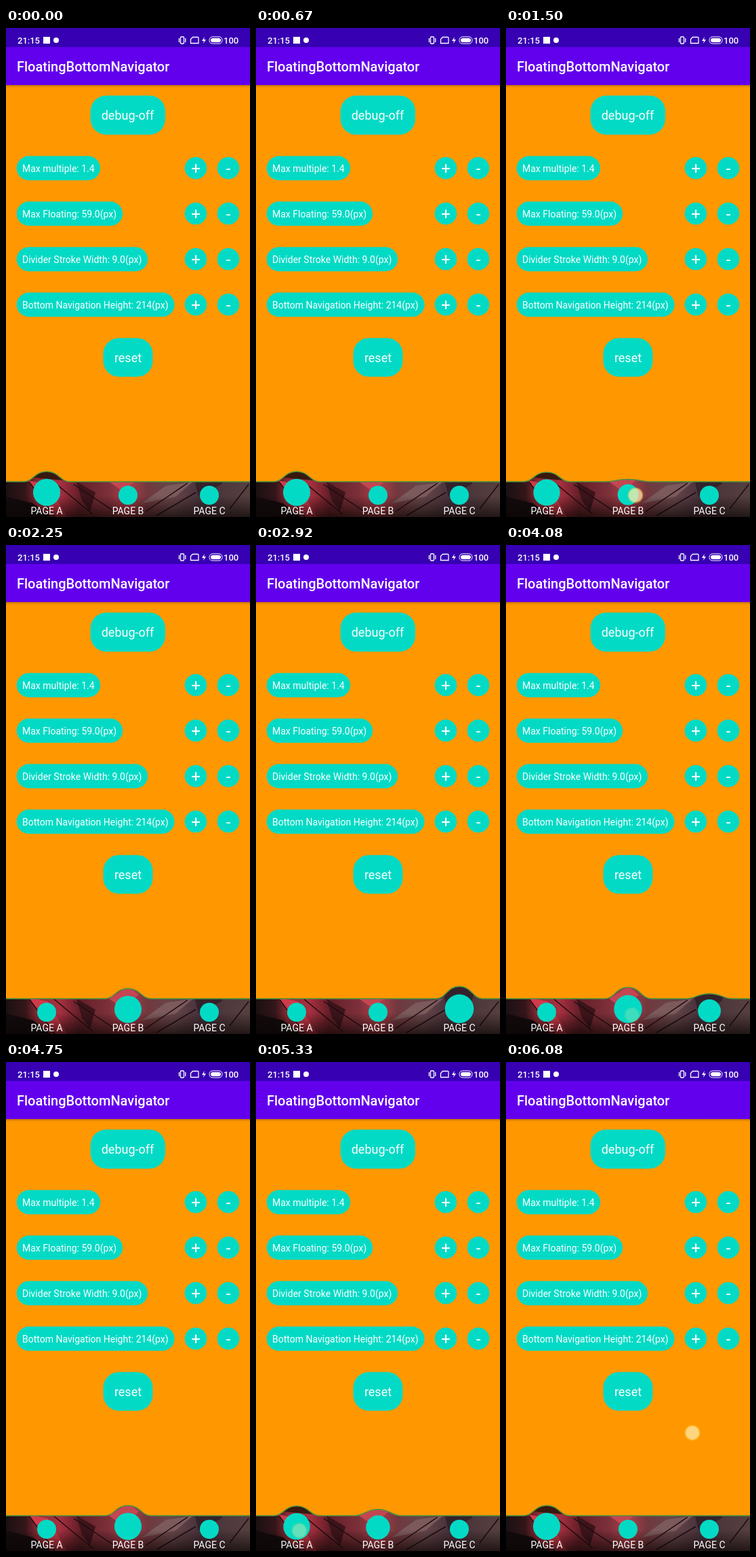
Animation of 360 by 720 pixels, one loop 6.16 s. Source, as an HTML page:

```html
<!DOCTYPE html>
<html lang="en">
<head>
<meta charset="utf-8">
<title>Floating bottom navigation</title>
<style>
  html, body { margin: 0; width: 100%; height: 100%; overflow: hidden; background: #ff9800; }
  svg { display: block; width: 360px; height: 720px; }
  text { font-family: Roboto, "Noto Sans", sans-serif; fill: #fff; }
  .mid { text-anchor: middle; }
  .teal { fill: #03dac5; }
</style>
</head>
<body>
<svg viewBox="0 0 360 720">
  <defs>
    <linearGradient id="shade" x1="0" y1="0" x2="0" y2="1">
      <stop offset="0" stop-color="#7a3d00" stop-opacity=".4"/>
      <stop offset="1" stop-color="#7a3d00" stop-opacity="0"/>
    </linearGradient>
    <linearGradient id="photo">
      <stop offset="0" stop-color="#1a1012"/>
      <stop offset=".08" stop-color="#34161a"/>
      <stop offset=".13" stop-color="#8c2a34"/>
      <stop offset=".22" stop-color="#a83040"/>
      <stop offset=".3" stop-color="#641f28"/>
      <stop offset=".42" stop-color="#7c303a"/>
      <stop offset=".5" stop-color="#b23e4a"/>
      <stop offset=".58" stop-color="#70383e"/>
      <stop offset=".68" stop-color="#66464a"/>
      <stop offset=".8" stop-color="#46303a"/>
      <stop offset="1" stop-color="#56403f"/>
    </linearGradient>
    <linearGradient id="dusk" x1="0" y1="0" x2="0" y2="1">
      <stop offset=".4" stop-color="#0c0604" stop-opacity="0"/>
      <stop offset="1" stop-color="#0c0604" stop-opacity=".7"/>
    </linearGradient>
    <clipPath id="clip"><path id="shape"/></clipPath>
  </defs>

  <rect width="360" height="720" fill="#ff9800"/>
  <rect width="360" height="84" fill="#6200ee"/>
  <rect width="360" height="28" fill="#3700b3"/>
  <rect y="84" width="360" height="4" fill="url(#shade)"/>

  <!-- status bar -->
  <g font-size="13" font-weight="500">
    <text x="17" y="23">21:15</text>
    <text x="321" y="23">100</text>
  </g>
  <g fill="#fff">
    <rect x="55" y="13" width="10" height="10"/>
    <circle cx="74" cy="18" r="4"/>
    <path d="M293 13l-4 6h3l-1 4 4-6h-3z"/>
    <rect x="302" y="15" width="15" height="6" rx="3"/>
  </g>
  <g fill="none" stroke="#fff" stroke-width="1.3">
    <rect x="257.500" y="13" width="5" height="10" rx="1"/>
    <path d="M255.500 15v6M264.800 15v6"/>
    <path d="M275.500 13.500h7.500q1 0 1 1v8h-11.500v-6z"/>
    <rect x="300" y="13" width="19" height="10" rx="4.500" stroke-width="1"/>
  </g>
  <text x="16" y="64" font-size="20" font-weight="500">FloatingBottomNavigator</text>

  <g id="panel"></g>

  <!-- bottom bar -->
  <g clip-path="url(#clip)">
    <rect y="640" width="360" height="80" fill="url(#photo)"/>
    <path d="M26 640H96V667L40 662Z" fill="#38180f"/>
    <path d="M32 666L62 672 90 720H70Z" fill="#d23a4a"/>
    <path d="M0 690L40 700 66 720H0Z" fill="#120a0c"/>
    <path d="M104 668L132 684 124 712 112 696Z" fill="#3c141a"/>
    <path d="M152 668L180 650 196 662 172 682Z" fill="#c44652"/>
    <path d="M200 700L236 674 276 668 250 690Z" fill="#7c5a5c"/>
    <path d="M272 640H330L318 672 284 690Z" fill="#34222a"/>
    <path d="M34 668L72 720M70 668L128 716M100 672L160 712M206 712L268 670M222 718L280 684M330 708L358 672"
          fill="none" stroke="#1c0b0e" stroke-width="1.500"/>
    <rect y="668" width="360" height="52" fill="url(#dusk)"/>
  </g>
  <path id="edge" fill="none" stroke="#4a9440" stroke-width="1.500"/>
  <g id="tabs"></g>
  <g id="touch">
    <circle r="11.500" fill="#ffd84a" opacity=".45"/>
    <circle r="10" fill="#fff0d0" opacity=".55"/>
  </g>
</svg>
<script>
  const $ = id => document.getElementById(id);
  const LOOP = 6160, STEP = 1000 / 12, GROW = 500, SHRINK = 300;
  const centers = [60, 180, 300];

  const pill = (x, y, w, h, r) =>
    `<rect class="teal" x="${x}" y="${y}" width="${w}" height="${h}" rx="${r}"/>`;
  const label = (x, y, size, text, cls = "mid") =>
    `<text class="${cls}" x="${x}" y="${y}" font-size="${size}">${text}</text>`;
  const knob = (x, y, text) =>
    `<circle class="teal" cx="${x}" cy="${y}" r="16.3"/>` + label(x, y + 8.5, 24, text);

  const rows = [
    ["Max multiple: 1.4", 123],
    ["Max Floating: 59.0(px)", 156],
    ["Divider Stroke Width: 9.0(px)", 193],
    ["Bottom Navigation Height: 214(px)", 232.5]
  ];
  $("panel").innerHTML =
    pill(124.6, 99.5, 110.4, 57.5, 23) + label(179.5, 135, 18, "debug-off") +
    pill(143.5, 456.5, 73, 57, 23) + label(180, 491.5, 18, "reset") +
    rows.map(([text, w], i) => {
      const y = 189 + 67 * i;
      return pill(15.7, y - 0.4, w + 0.4, 35.6, 17.8) + label(24, y + 22.5, 14, text, "") +
        knob(280, y + 17.3, "+") + knob(328, y + 17.3, "-");
    }).join("");

  $("tabs").innerHTML = centers.map((x, i) =>
    `<circle class="teal" cx="${x}"/>` + label(x, 716, 14, "PAGE " + "ABC"[i])).join("");
  const dots = $("tabs").querySelectorAll("circle");

  // release time, previous tab, next tab, touch position
  const taps = [
    { at: 1480, from: 0, to: 1, x: 191, y: 688 },
    { at: 2600, from: 1, to: 2, x: 304, y: 690 },
    { at: 3930, from: 2, to: 1, x: 186, y: 692 },
    { at: 5220, from: 1, to: 0, x: 64, y: 690 },
    { at: 6120, x: 275, y: 546 }
  ];

  const clamp = v => Math.min(1, Math.max(0, v));
  const overshoot = p => {
    const u = p - 1;
    return u * u * (4 * u + 3) + 1;
  };

  function lifts(t) {
    const lift = [1, 0, 0];
    for (const { at, from, to } of taps) {
      if (to === undefined || t < at) continue;
      lift[from] = 1 - clamp((t - at) / SHRINK);
      lift[to] = overshoot(clamp((t - at) / GROW));
    }
    return lift;
  }

  function draw(t) {
    const lift = lifts(t);
    let line = "M0 668";
    centers.forEach((x, i) => {
      const top = 668 - 15 * lift[i];
      line += `H${x - 34}C${x - 20} 668 ${x - 18} ${top} ${x} ${top}` +
        `S${x + 20} 668 ${x + 34} 668`;
      dots[i].setAttribute("cy", 688 - 4.3 * lift[i]);
      dots[i].setAttribute("r", 14 + 6 * lift[i]);
    });
    line += "H360";
    $("edge").setAttribute("d", line);
    $("shape").setAttribute("d", line + "V720H0Z");

    const tap = taps.find(({ at }) => t > at - 110 && t < at + 210);
    $("touch").setAttribute("opacity", tap ? clamp(1 - (t - tap.at - 20) / 190) : 0);
    if (tap) $("touch").setAttribute("transform", `translate(${tap.x} ${tap.y})`);
  }

  const start = performance.now();
  function tick(now) {
    const t = Math.max(0, now - start) % LOOP;
    draw(Math.floor((t + 4) / STEP) * STEP);
    requestAnimationFrame(tick);
  }
  draw(0);
  requestAnimationFrame(tick);
</script>
</body>
</html>
```
